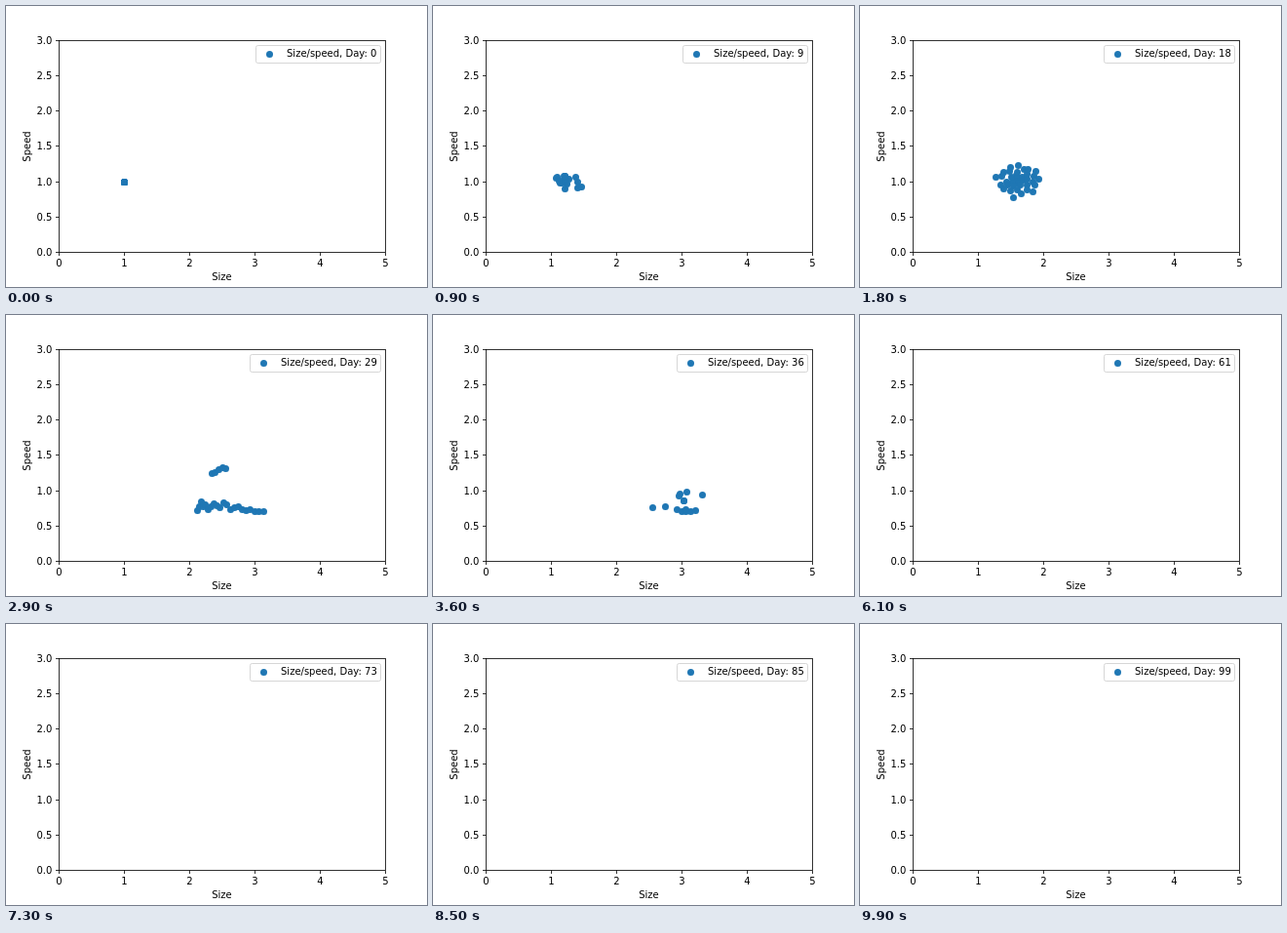
An HTML page with a canvas for the animation above (10000 ms loop, 432 px wide and 288 px high).

```html
<!DOCTYPE html>
<html lang="en">
<head>
<meta charset="utf-8">
<title>Size and speed by day</title>
<style>
html, body { margin: 0; width: 100%; height: 100%; overflow: hidden; background: #fff; }
canvas { display: block; width: 432px; height: 288px; }
</style>
</head>
<body>
<canvas id="plot" width="432" height="288"></canvas>
<script>
const ctx = document.getElementById('plot').getContext('2d');
const DAY_MS = 100, DAYS = 100, BLUE = '#1f77b4', TURN = Math.PI * 2;
const LEFT = 54, RIGHT = 388.8, TOP = 34.56, BOTTOM = 252;
const snap = v => Math.floor(v + 0.5) + 0.5;

let seed = 41;
function rand() {
  seed = (seed + 0x6D2B79F5) | 0;
  let t = Math.imul(seed ^ (seed >>> 15), 1 | seed);
  t = (t + Math.imul(t ^ (t >>> 7), 61 | t)) ^ t;
  return ((t ^ (t >>> 14)) >>> 0) / 4294967296;
}
const spread = () => rand() + rand() + rand() - 1.5;
const pick = n => Math.floor(rand() * n);

// n points along a path, where path(u) runs over 0 <= u < 1
const scatter = (n, path) => Array.from({ length: n }, (_, i) => path((i + 0.5) / n, i));

// Each dot keeps its place and is visible while born <= day < dies
const dots = [];
const addDot = (x, y, born, dies) => dots.push({ x: snap(x), y: snap(y), born, dies });

// Everyone here is alive on the given day; small ones die first, large ones are born last
function addCloud(points, day, before, after) {
  const xs = points.map(p => p[0]);
  const min = Math.min(...xs), range = Math.max(...xs) - min;
  for (const [x, y] of points) {
    const u = (x - min) / range;
    addDot(x, y,
      day - Math.floor((1 - u) * before + rand() * 2.5),
      day + 1 + Math.floor(u * after + rand() * 2.5));
  }
}

// Population mean: day, x, y, spread
const trend = [[0, 121, 180, 10], [18, 162, 179, 18], [29, 226, 188, 24], [45, 288, 199, 18], [60, 318, 203, 14]];
function trendAt(day) {
  const i = trend.findIndex(k => k[0] >= day);
  const a = trend[i - 1], b = trend[i];
  const u = (day - a[0]) / (b[0] - a[0]);
  return a.map((v, k) => v + (b[k] - v) * u);
}

function addBetween(first, last, count) {
  for (let i = 0; i < count; i++) {
    const born = first + pick(last - first);
    const dies = Math.min(born + 3 + pick(6), last + 1);
    const [, x, y, s] = trendAt(born + 1);
    addDot(x + spread() * s, Math.min(y + spread() * s * 0.7, 211), born, dies);
  }
}

// A round swarm, then an arm of slow ones with a small fast group, then a loose ring
const swarm = scatter(41, (u, i) => {
  const r = u ** 0.8, a = i * 2.4;
  return [162 + 24 * r * Math.cos(a) + spread() * 2, 178 + 17 * r * Math.sin(a) + spread() * 2];
});
const arm = scatter(21, u => [196 + 70 * u ** 1.4, 193 + 8 * u + spread() * 8 * (1 - u)]);
const fast = scatter(5, u => [209 + 18 * u, 163 - 10 * u + spread() * 4]);
const ring = scatter(10, u => [287 + 24 * Math.cos(u * TURN), 200 + 10 * Math.sin(u * TURN)]);

for (let i = 0; i < 30; i++) addDot(120.96, 179.52, 0, 3 + pick(7));
addBetween(1, 17, 65);
addCloud(swarm, 18, 6, 5);
addBetween(19, 28, 26);
addCloud([...arm, ...fast], 29, 6, 6);
addBetween(30, 44, 24);
addCloud(ring, 45, 7, 10);
addBetween(46, 57, 3);

function line(x1, y1, x2, y2) {
  ctx.beginPath();
  ctx.moveTo(x1, y1);
  ctx.lineTo(x2, y2);
  ctx.stroke();
}

function disc(x, y) {
  ctx.beginPath();
  ctx.arc(x, y, 3.5, 0, TURN);
  ctx.fill();
}

function text(str, x, y, align) {
  ctx.textAlign = align;
  ctx.fillText(str, x, y);
}

function drawAxes() {
  ctx.fillStyle = ctx.strokeStyle = '#000';
  ctx.lineWidth = 0.8;
  const l = snap(LEFT), t = snap(TOP), b = snap(BOTTOM);
  ctx.strokeRect(l, t, snap(RIGHT) - l, b - t);
  for (let i = 0; i <= 5; i++) {
    const x = snap(LEFT + (RIGHT - LEFT) * i / 5);
    line(x, b, x, b + 3.5);
    text(String(i), x, 267, 'center');
  }
  for (let i = 0; i <= 6; i++) {
    const y = snap(BOTTOM - (BOTTOM - TOP) * i / 6);
    line(l - 3.5, y, l, y);
    text((i / 2).toFixed(1), 47.3, y + 3.5, 'right');
  }
  text('Size', 221.5, 281, 'center');
  ctx.save();
  ctx.translate(25, 144);
  ctx.rotate(-Math.PI / 2);
  text('Speed', 0, 0, 'center');
  ctx.restore();
}

function drawLegend(day) {
  const x = day < 10 ? 256.5 : 250.5;
  ctx.beginPath();
  ctx.roundRect(x, 40.5, 384.5 - x, 18, 2);
  ctx.fillStyle = 'rgba(255,255,255,.8)';
  ctx.fill();
  ctx.strokeStyle = 'rgba(204,204,204,.8)';
  ctx.lineWidth = 1;
  ctx.stroke();
  ctx.fillStyle = BLUE;
  disc(x + 14, 49.5);
  ctx.fillStyle = '#000';
  text('Size/speed, Day: ' + day, x + 31.5, 52, 'left');
}

function draw() {
  const day = Math.floor(performance.now() / DAY_MS) % DAYS;
  ctx.fillStyle = '#fff';
  ctx.fillRect(0, 0, 432, 288);
  ctx.font = '10px "DejaVu Sans", sans-serif';
  ctx.fillStyle = BLUE;
  for (const d of dots) if (day >= d.born && day < d.dies) disc(d.x, d.y);
  drawAxes();
  drawLegend(day);
  requestAnimationFrame(draw);
}
draw();
</script>
</body>
</html>
```
